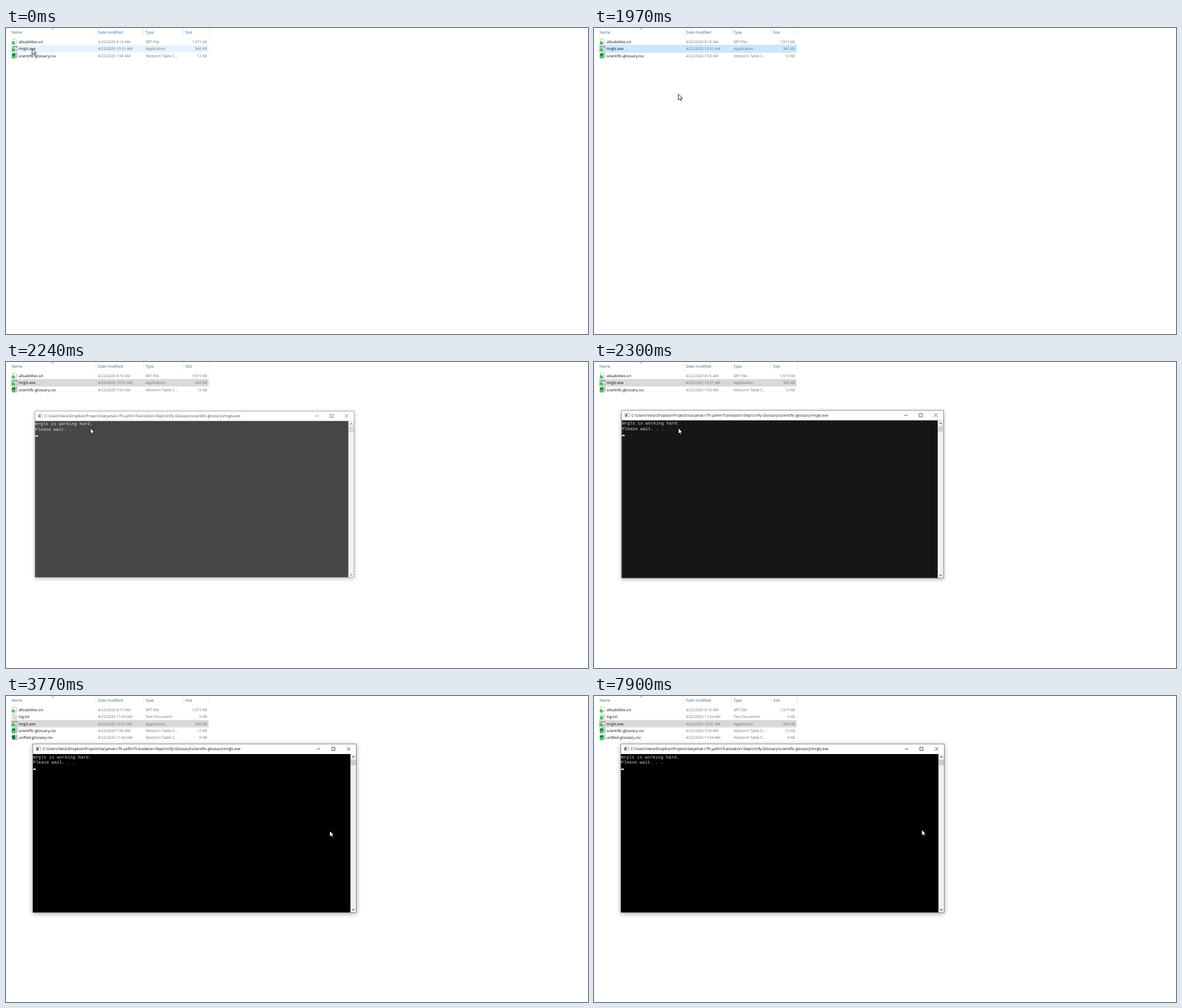
Write an HTML page that moves like this. It is 1031 by 543 pixels and loops after 8 s.

```html
<!DOCTYPE html>
<html lang="en">
<head>
<meta charset="utf-8">
<title>Glossary run</title>
<style>
  html, body { margin: 0; width: 100%; height: 100%; overflow: hidden; background: #fff; }
  svg { display: block; }
  text {
    font: 6.7px "Open Sans", "Noto Sans", sans-serif;
    font-variant-ligatures: none;
    text-rendering: geometricPrecision;
    white-space: pre;
  }
  .head { fill: #44587c; }
  .info { fill: #6d6d6d; }
  .num { font-size: 6.55px; }
  .mono text { font: 7.8px "Liberation Mono", "DejaVu Sans Mono", monospace; fill: #ccc; }
  #window { transform-origin: 334px 234.5px; }
  .shadow { filter: drop-shadow(0 2px 4px rgba(0, 0, 0, .35)); }
</style>
</head>
<body>
<svg width="1031" height="543" viewBox="0 0 1031 543">
  <g id="header"></g>
  <rect id="hover" x="8" width="351" height="13" fill="#e5f3ff"/>
  <rect id="selection" x="8.3" width="350.4" height="12.5" stroke-width=".6"/>
  <g id="files"></g>

  <g id="window">
    <rect class="shadow" x="47" y="84.7" width="574" height="299.8" fill="#666"/>
    <rect x="47.8" y="85.5" width="572.4" height="17.5" fill="#fff"/>
    <g>
      <rect x="53.3" y="90.3" width="8" height="6.6" fill="#f4f4f4" stroke="#8b9299" stroke-width=".7"/>
      <rect x="54.2" y="91.7" width="3.4" height="4.3" fill="#3d7773"/>
    </g>
    <text id="title" x="65" y="96.4"></text>
    <g fill="none" stroke="#222" stroke-width=".8">
      <path d="M550.5 94H556.7M603.8 90.7L610 96.9M610 90.7L603.8 96.9"/>
      <rect x="577.2" y="91" width="5.6" height="5.6"/>
    </g>
    <rect x="48" y="103" width="562.3" height="280.8"/>
    <rect x="610.3" y="103" width="9.9" height="280.8" fill="#f0f0f0"/>
    <rect x="610.9" y="113" width="9" height="10" fill="#cdcdcd"/>
    <path d="M613.3 109.2L615.4 107L617.5 109.2M613.3 378.2L615.4 380.4L617.5 378.2" fill="none" stroke="#505050" stroke-width="1.1"/>
    <g class="mono">
      <text x="48" y="110.5">mrgls is working hard.</text>
      <text x="48" y="120">Please wait. . .</text>
    </g>
    <rect id="caret" x="48.2" y="128.8" width="4.7" height="2.2" fill="#fff"/>
  </g>

  <g id="pointer">
    <path d="M0 0V10.4L2.4 8.2L4 11.7L5.7 11L4.2 7.6H7.4Z" fill="#fff" stroke="#000" stroke-width=".85"/>
    <circle id="ring" cx="8.7" cy="1" r="3.8" fill="none" stroke="#2b9fe0" stroke-width="2"/>
  </g>
</svg>
<script>
const LOOP = 8000, TICK = 200 / 3;
const OPENING = 2100, LISTED = 3100;
const $ = id => document.getElementById(id);
const show = (el, on) => el.setAttribute('visibility', on ? 'visible' : 'hidden');
const label = (x, y, str, cls = '', anchor = 'start') =>
  `<text x="${x}" y="${y}" class="${cls}" text-anchor="${anchor}">${str}</text>`;
const rowTop = row => 18 + 12.3 * row;

// name, date, type, size, icon, first row, final row, badge time
const sheet = 'Velstorin Table C...';
const files = [
  ['allsubtitles.srt', '8:15', 'SRT File', '1,971', 'page', 0, 0, 0],
  ['log.txt', '11:04', 'Text Document', '0', 'lines', null, 1, 4640],
  ['mrgls.exe', '10:31', 'Application', '342', 'app', 1, 2, 0],
  ['scientific-glossary.csv', '7:50', sheet, '12', 'sheet', 2, 3, 0],
  ['unified-glossary.csv', '11:04', sheet, '0', 'sheet', null, 4, 5770]
];

const page = '<path d="M11.7 1.6H16.8L18.8 3.6V10.6H11.7Z" fill="#fff" stroke="#999" stroke-width=".7"/>';
const icons = {
  page,
  lines: page + '<path d="M13 4H17.4M13 5.6H17.6M13 7.2H17.6M13 8.8H17.6" stroke="#aaa" stroke-width=".7"/>',
  app: '<rect x="11.6" y="2.4" width="8.2" height="7.6" fill="#fff" stroke="#7b858e" stroke-width=".7"/>' +
    '<path d="M11.6 3.5H19.8" stroke="#7b858e" stroke-width="1.4"/>' +
    '<path d="M14 6H18.6M14 8H18.6" stroke="#9aa7b3" stroke-width=".8"/>',
  sheet: '<rect x="13.4" y="1.7" width="6" height="8.8" fill="#fff" stroke="#3f8a5d" stroke-width=".7"/>' +
    '<path d="M15 4H19M15 6H19M15 8H19" stroke="#3f8a5d" stroke-width=".7"/>' +
    '<rect x="10.4" y="2.6" width="6" height="7" fill="#1d7444"/>'
};
const badge = '<g class="badge"><circle cx="13" cy="8.6" r="2.9" fill="#35b33c"/>' +
  '<path d="M11.5 8.6L12.6 9.7L14.5 7.5" fill="none" stroke="#fff" stroke-width=".8"/></g>';

$('header').innerHTML =
  [[10, 'Name'], [163, 'Date modified'], [247, 'Type'], [317.5, 'Size']]
    .map(([x, str]) => label(x, 10.2, str, 'head')).join('') +
  '<path d="M159.5 0V14M243.5 0V14M313.5 0V14M360.5 0V14" stroke="#e3e3e3" stroke-width=".9"/>' +
  '<path d="M80.6 2.6L83 .5L85.4 2.6" fill="none" stroke="#777" stroke-width=".8"/>';

$('files').innerHTML = files.map(([name, time, type, size, icon]) =>
  `<g>${icons[icon]}${badge}` +
  label(22.2, 9, name) +
  label(162.8, 9, `4/22/2020 ${time} AM`, 'info num') +
  label(247.2, 9, type, 'info') +
  label(356, 9, size + ' KB', 'info num', 'end') + '</g>').join('');

$('title').textContent = ['C:', 'Users', 'Vera', 'Dropbox', 'Projects', 'tarjamat-r7lt-ya9in',
  'Translation-Step', 'Unify-Glossary', 'scientific-glossary', 'mrgls.exe'].join('\\');

// time, x, y of the pointer tip
const path = [
  [0, 46.3, 37], [1300, 46.3, 37], [1500, 60, 47], [1767, 128, 100], [1966, 149.4, 117.2],
  [2567, 149.4, 117.2], [2700, 220, 166], [2833, 275.5, 205],
  [3167, 275.5, 205], [3367, 340, 228], [3567, 480, 246], [3766, 573.4, 239.4], [3899, 580.6, 237.2]
];
// time, scale, opacity of the opening window
const opening = [[OPENING, .967, .3], [2240, .9866, .72], [2300, .995, .91], [2370, 1, 1]];
const caretOff = [[3170, 3700], [4240, 4700], [5300, 5770], [6370, 6840], [7440, 7900]];

const snap = t => Math.max(0, (Math.floor(t / TICK - .5 + .001) + .5) * TICK);

function pointerAt(t) {
  const next = path.findIndex(key => key[0] > t);
  if (next < 0) return path[path.length - 1].slice(1);
  const a = path[next - 1], b = path[next], k = (t - a[0]) / (b[0] - a[0]);
  return [a[1] + (b[1] - a[1]) * k, a[2] + (b[2] - a[2]) * k];
}

function draw(t) {
  const [x, y] = pointerAt(snap(t));
  $('pointer').setAttribute('transform', `translate(${x} ${y})`);
  show($('ring'), t >= 840 && t < 1640);

  const over = Math.floor((y - rowTop(0)) / 12.3);
  show($('hover'), t < OPENING && over <= 2);
  $('hover').setAttribute('y', rowTop(over));

  const listed = t >= LISTED, sel = $('selection');
  const [fill, line] = t < 2240 ? ['#cce8ff', '#99d1ff'] : ['#d9d9d9', '#d9d9d9'];
  show(sel, t >= 500);
  sel.setAttribute('y', rowTop(listed ? 2 : 1) + .3);
  sel.setAttribute('fill', fill);
  sel.setAttribute('stroke', line);

  files.forEach(([, , , , , first, last, badgeTime], i) => {
    const el = $('files').children[i], row = listed ? last : first;
    el.style.display = row === null ? 'none' : '';
    el.setAttribute('transform', `translate(0 ${rowTop(row || 0)})`);
    show(el.querySelector('.badge'), t >= badgeTime);
  });

  const win = $('window'), pose = opening.filter(key => key[0] <= t).pop();
  win.style.display = pose ? '' : 'none';
  if (pose) {
    win.style.transform = `scale(${pose[1]})`;
    win.style.opacity = pose[2];
  }
  show($('caret'), !caretOff.some(([from, to]) => t >= from && t < to));
}

const start = performance.now();
function frame() {
  draw((performance.now() - start) % LOOP);
  requestAnimationFrame(frame);
}
frame();
</script>
</body>
</html>
```
